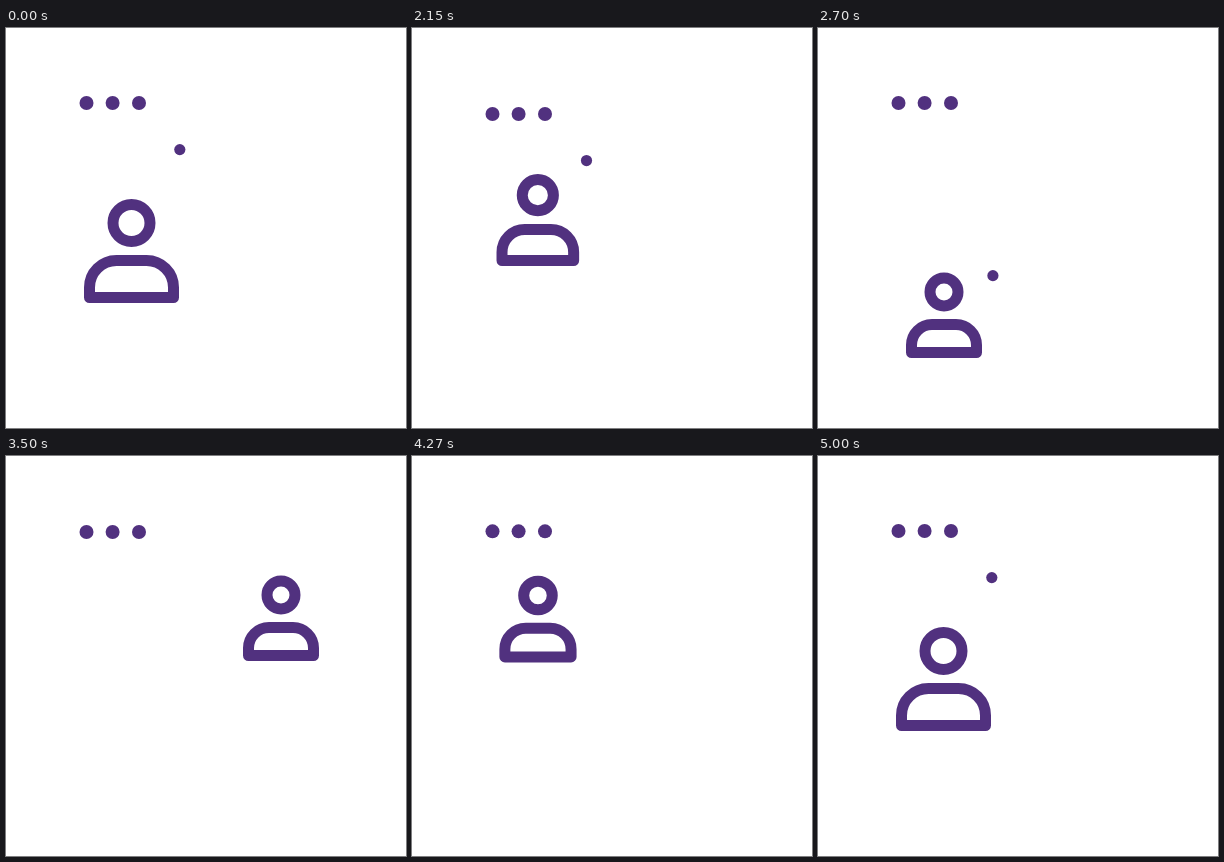
An HTML page that plays this animation: 400 by 400 pixels, repeating every 5.02 s.

```html
<!DOCTYPE html>
<html lang="en">
<head>
<meta charset="utf-8">
<title>Active speaker</title>
<style>
  html, body { margin: 0; width: 100%; height: 100%; overflow: hidden; background: #fff; }
  svg { display: block; width: 100vw; height: 100vh; }
</style>
</head>
<body>
<svg viewBox="0 0 400 400" fill="#51317f">
  <g id="call">
    <circle cx="80.5" cy="75" r="7"/>
    <circle cx="106.6" cy="75" r="7"/>
    <circle cx="133" cy="75" r="7"/>
    <circle id="light" r="5.6"/>
    <g fill="none" stroke="#51317f" stroke-width="11" stroke-linejoin="round">
      <circle id="head"/>
      <path id="body"/>
    </g>
  </g>
</svg>
<script>
const LOOP = 5020, RESIZE = 430;
// When another person speaks
const SECOND = 2272, THIRD = 3350, FIRST = 4250;
// When the person starts to shrink and to grow
const SHRINK = 1988, GROW = 4238;
const lightOff = [[2950, 3100], [THIRD, 3550], [3920, 4100], [FIRST, 4400]];

const [call, light, head, body] = ['call', 'light', 'head', 'body'].map(id => document.getElementById(id));
const clamp = x => Math.min(1, Math.max(0, x));
const mix = (a, b, p) => a + (b - a) * p;

// The curve of cubic-bezier(.25, .1, .25, 1)
function ease(x) {
  x = clamp(x);
  let low = 0, high = 1;
  for (let i = 0; i < 20; i++) {
    const s = (low + high) / 2;
    if (0.75 * s * (1 - s) + s ** 3 < x) low = s; else high = s;
  }
  const s = low, r = 1 - s;
  return 0.3 * r * r * s + 3 * r * s * s + s ** 3;
}

// Quick drop, then a softer return
function dip(t, height, down, up) {
  const drop = Math.sin(clamp(t / down) * Math.PI / 2) ** 2;
  return height * drop * (1 - ease((t - down) / up));
}

function set(el, attrs) {
  for (const name in attrs) el.setAttribute(name, attrs[name]);
}

function drawPerson(x, y, size) {
  const at = (small, large) => mix(small, large, size);
  const half = at(32.5, 42), corner = at(20.5, 27);
  const top = y + at(32.5, 37.5), bottom = y + at(60.5, 74.5);
  const flat = 2 * (half - corner);
  set(head, { cx: x, cy: y, r: at(14, 18.5) });
  set(body, {
    d: `M${x - half} ${bottom}V${top + corner}a${corner} ${corner} 0 0 1 ${corner} ${-corner}` +
       `h${flat}a${corner} ${corner} 0 0 1 ${corner} ${corner}V${bottom}Z`
  });
}

function draw(t) {
  const split = ease((t - SHRINK) / RESIZE);
  let size = t < FIRST ? 1 - split : ease((t - GROW) / RESIZE);
  let x = mix(126, 125.5, size), y = mix(135.5, 195, size), lightY = 121.6;

  if (t >= SECOND && t < THIRD) {
    const slide = 126 + 240 * (1 - split);
    x = 126;
    y = 138 + slide;
    lightY += slide;
    size = 0;
  } else if (t >= THIRD && t < FIRST) {
    x = 275;
    y = 138;
  }

  drawPerson(x, y, size);
  set(light, {
    cx: x + mix(48.9, 48.3, size),
    cy: lightY,
    visibility: lightOff.some(([from, to]) => t >= from && t < to) ? 'hidden' : 'visible'
  });
  const drop = dip(t - 2000, 13.4, 210, 540) + dip(t - 3440, 3, 150, 210) + dip(t - FIRST, 13.4, 210, 540);
  set(call, { transform: `translate(0 ${drop})` });
}

const start = performance.now();
function tick() {
  draw((performance.now() - start) % LOOP);
  requestAnimationFrame(tick);
}
tick();
</script>
</body>
</html>
```
